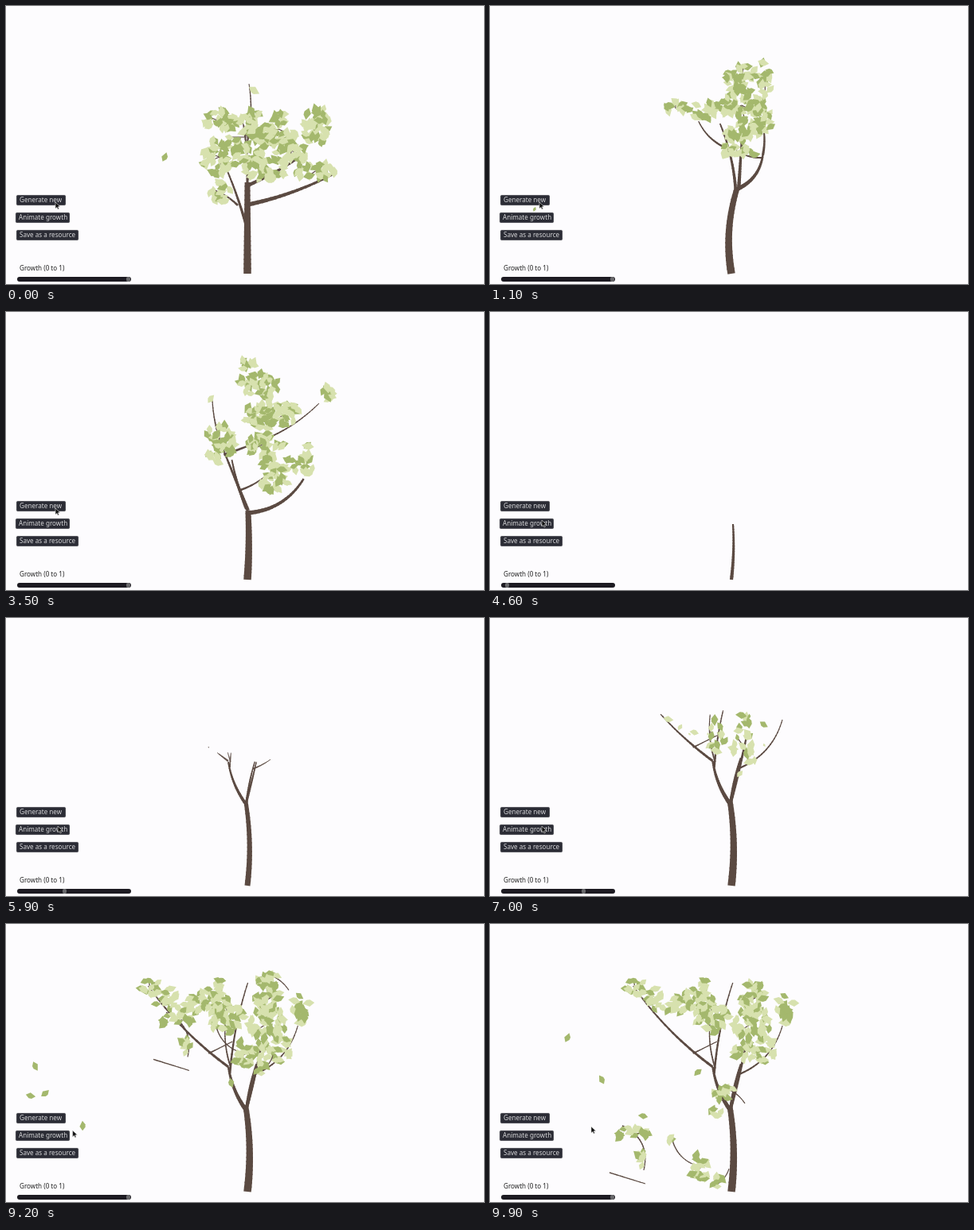
Animation of 600 by 350 pixels, one loop 10 s. Source, as an HTML page with a canvas:

```html
<!DOCTYPE html>
<html lang="en">
<head>
<meta charset="utf-8">
<title>Growing tree</title>
<style>
html, body { margin: 0; width: 100%; height: 100%; overflow: hidden; background: #fdfcfe; }
canvas { position: absolute; left: 0; top: 0; }
div { position: absolute; box-sizing: border-box; font: 8.1px/11px "Noto Sans", sans-serif; white-space: nowrap; }
.button { height: 13px; background: #2b2c35; color: #d6d6d8; border: 1px solid #4d4d55; border-radius: 2px;
  padding-left: 3px; line-height: 10px; box-shadow: 0 0 1px #777; }
#track { left: 14px; top: 341px; width: 143px; height: 6px; border-radius: 3px; background: #1d1b22; }
#knob { top: 341px; width: 5px; height: 6px; border-radius: 2px; background: #68686b; }
</style>
</head>
<body>
<div class="button" style="left:13px;top:238px;width:62px">Generate new</div>
<div class="button" style="left:12px;top:260px;width:68px">Animate growth</div>
<div class="button" style="left:13px;top:282px;width:78px">Save as a resource</div>
<div style="left:17px;top:324px;color:#222">Growth (0 to 1)</div>
<div id="track"></div>
<div id="knob"></div>
<canvas width="600" height="350"></canvas>
<script>
const ctx = document.querySelector('canvas').getContext('2d');
const knob = document.getElementById('knob');
const BASE = { x: 303, y: 337 };
const BARK = '#5b4a42', LIGHT = '#d7e1ae', DARK = '#a4b86d';
const clamp = v => Math.max(0, Math.min(1, v));
const mix = (a, b, u) => a + (b - a) * u;

function random(seed) {
  return () => {
    seed = seed + 0x6D2B79F5 | 0;
    let r = Math.imul(seed ^ seed >>> 15, 1 | seed);
    r = r + Math.imul(r ^ r >>> 7, 61 | r) ^ r;
    return ((r ^ r >>> 14) >>> 0) / 2 ** 32;
  };
}

// Leaf cluster: centre x, y and radius x, y; every 14th leaf has a stem to the centre
function scatter(clusters, seed) {
  const rnd = random(seed), leaves = [];
  for (const [cx, cy, rx, ry] of clusters) {
    const count = Math.max(1, Math.round(rx * ry / 11));
    for (let i = 0; i < count; i++) {
      const a = rnd() * 2 * Math.PI, r = Math.sqrt(rnd());
      leaves.push({
        x: cx + Math.cos(a) * r * rx, y: cy + Math.sin(a) * r * ry, cx, cy, stem: i % 14 === 7,
        turn: rnd() * 2 * Math.PI, size: .8 + rnd() * .35,
        color: rnd() < .45 ? DARK : LIGHT, birth: 1 - .4 * rnd() ** 2, order: rnd()
      });
    }
  }
  return leaves.sort((a, b) => a.order - b.order);
}

// Branch: start, end, bend; widths and growth times follow from order and height
function plant(seed, branches, clusters, width = 9.5) {
  return {
    leaves: scatter(clusters, seed),
    branches: branches.map(([x0, y0, x1, y1, bend], i) => {
      const w0 = Math.max(1.4, i ? width * .55 * .84 ** (i - 1) : width);
      return {
        x0, y0, x1, y1, w0, w1: Math.max(1, w0 * (i ? .45 : .7)),
        cx: (x0 + x1) / 2 - bend * (y1 - y0), cy: (y0 + y1) / 2 + bend * (x1 - x0),
        from: i ? .13 + (234 - y0) * .004 : -.12,
        to: i ? Math.min(1, .13 + (234 - y1) * .0055) : .13
      };
    })
  };
}

const round = plant(3, [
  [303,337,303,222,0], [304,250,412,211,.07], [303,226,372,188,.05], [302,278,278,208,.03],
  [303,222,298,150,.05], [291,251,262,232,.1], [302,175,305,98,.1]
], [
  [268,145,18,15], [268,190,22,24], [305,165,26,34], [342,155,22,20], [390,150,18,26],
  [358,182,22,18], [325,205,28,14], [388,208,27,11], [270,235,14,13], [311,107,3,2]
]);

const slanted = plant(8, [
  [303,337,310,229,-.12], [309,231,342,188,.28], [312,230,316,160,0], [308,230,288,148,.08],
  [342,188,342,150,.1], [299,180,261,145,-.2], [341,191,304,178,-.2]
], [
  [340,67,4,6], [315,92,22,18], [344,95,9,18], [315,125,27,20], [340,145,14,20],
  [318,160,22,14], [268,132,24,11], [232,129,12,9], [300,180,10,9], [321,185,11,7]
]);

const tall = plant(12, [
  [303,337,302,250,-.03], [302,253,232,210,-.25], [302,250,330,180,0], [304,248,322,186,.05],
  [332,180,278,160,0], [314,225,278,205,-.1], [330,180,346,106,.1], [280,160,212,115,-.1]
], [
  [202,104,11,11], [303,64,11,9], [288,95,26,18], [258,130,26,16], [287,132,20,18], [280,165,26,16],
  [338,165,20,24], [350,108,4,3], [227,185,9,18], [262,192,24,12], [270,215,20,12]
]);

const grown = plant(21, [
  [303,337,301,231,.07], [301,234,279,180,-.12], [301,234,321,150,.02], [302,232,314,176,-.05],
  [279,180,178,78,-.08], [281,188,303,74,-.06], [310,190,366,128,.25], [282,181,276,115,-.12],
  [254,163,284,148,0]
], [
  [180,79,13,12], [208,95,12,16], [230,105,10,14], [268,74,7,9], [258,98,22,18], [277,118,22,18],
  [328,95,15,22], [328,125,24,22], [320,160,17,13], [345,160,12,16], [370,108,11,19]
]);

const loose = plant(31, [
  [166,254,193,310,-.4], [150,313,195,327,0], [228,268,262,305,.3], [284,328,300,308,.2], [290,205,320,226,-.2]
], [
  [177,264,22,7], [188,295,7,13], [226,272,5,7], [262,308,12,18], [285,324,9,7], [296,214,14,10], [285,238,9,6]
], 1.6);

// Drifting leaves: x, y at the given time
const drifters = [
  [0, [[199,190]]],
  [8400, [[141,131], [135,168], [153,165], [200,206], [42,208]]],
  [9900, [[97,143], [140,196], [192,242], [261,187]]]
];

const wind = (y, t) => Math.sin(t / 480) * 2 * clamp((BASE.y - y) / 277) ** 2;

function fillShape(points, color) {
  ctx.beginPath();
  for (const [x, y] of points) ctx.lineTo(x, y);
  ctx.closePath();
  ctx.fillStyle = color;
  ctx.fill();
}

function line(a, b, width) {
  ctx.strokeStyle = BARK;
  ctx.lineWidth = width;
  ctx.beginPath();
  ctx.moveTo(...a);
  ctx.lineTo(...b);
  ctx.stroke();
}

function drawLeaf(x, y, turn, size, color) {
  ctx.save();
  ctx.translate(x, y);
  ctx.rotate(turn);
  ctx.scale(size, size);
  fillShape([[0,-7], [4,-2], [4,2], [0,7], [-4,1]], color);
  ctx.restore();
}

function drawBranch(b, g, t) {
  const reach = g === 1 ? 1 : clamp((g - b.from) / (b.to - b.from)), steps = 20;
  if (!reach) return;
  const at = u => {
    const v = 1 - u, y = v * v * b.y0 + 2 * u * v * b.cy + u * u * b.y1;
    return [v * v * b.x0 + 2 * u * v * b.cx + u * u * b.x1 + wind(y, t), y];
  };
  const thickness = Math.min(1, .4 + .8 * g), end = mix(1, b.w1, reach);
  for (let i = 0; i < steps; i++)
    line(at(i / steps * reach), at(Math.min(1, (i + 1.3) / steps) * reach), mix(b.w0, end, i / steps) * thickness);
}

function drawTree({ branches, leaves }, g, t, flip = 1, stretch = 1) {
  const kx = 1 - 1.5 * (1 - g), ky = 1 - .68 * (1 - g);
  const place = (x, y) => {
    const py = mix(BASE.y, y, ky);
    return [mix(BASE.x, x, kx) + wind(py, t), py];
  };
  const open = leaves.filter(l => g >= l.birth);
  ctx.save();
  ctx.translate(BASE.x, BASE.y);
  ctx.scale(flip, stretch);
  ctx.translate(-BASE.x, -BASE.y);
  for (const b of branches) drawBranch(b, g, t);
  for (const l of open) if (l.stem) line(place(l.x, l.y), place(l.cx, l.cy), 1.2);
  for (const l of open) {
    const size = g === 1 ? 1 : clamp((g - l.birth) * 12 + .3);
    drawLeaf(...place(l.x, l.y), l.turn + Math.sin(t / 300 + l.turn) * .12, l.size * size, l.color);
  }
  ctx.restore();
}

function drawLoose(t) {
  const p = clamp((t - 9000) / 900);
  if (!p) return;
  ctx.save();
  ctx.translate(45 * (1 - p), -150 * (1 - p * p));
  drawTree(loose, 1, 0);
  ctx.restore();
}

function drawDrifters(t) {
  for (const [time, spots] of drifters) {
    const d = t - time, life = 1200 - Math.abs(d);
    if (life > 0)
      spots.forEach(([x, y], i) =>
        drawLeaf(x - .13 * d, y + .06 * d, .4 - i * .9 + d / 350, .9 * clamp(life / 200), DARK));
  }
}

function drawMouse(t) {
  const down = clamp((t - 3900) / 400), away = clamp((t - 8900) / 1000);
  ctx.save();
  ctx.translate(62 + 3 * down + 62 * away, 247 + 15 * down - 7 * away);
  fillShape([[0,0], [0,8], [2,6.4], [3,9], [4.5,8.3], [3.3,5.8], [5.8,5.6]], '#111');
  ctx.strokeStyle = '#ddd';
  ctx.lineWidth = .6;
  ctx.stroke();
  ctx.restore();
}

function drawCurrentTree(t, g) {
  if (t < 600) drawTree(round, g, t);
  else if (t < 1300) drawTree(slanted, g, t);
  else if (t < 2000) drawTree(round, g, t, -1, 1.2);
  else if (t < 2800) drawTree(tall, g, t);
  else if (t < 3700) drawTree(tall, g, t, -1);
  else drawTree(grown, g, t);
}

function frame() {
  const t = Math.floor(performance.now() / 100) * 100 % 10000;
  const g = t < 4450 ? 1 : clamp((t - 4445) * .00029);
  ctx.clearRect(0, 0, 600, 350);
  drawCurrentTree(t, g);
  drawLoose(t);
  drawDrifters(t);
  drawMouse(t);
  knob.style.left = 12.5 + 138 * g + 'px';
  requestAnimationFrame(frame);
}
frame();
</script>
</body>
</html>
```
